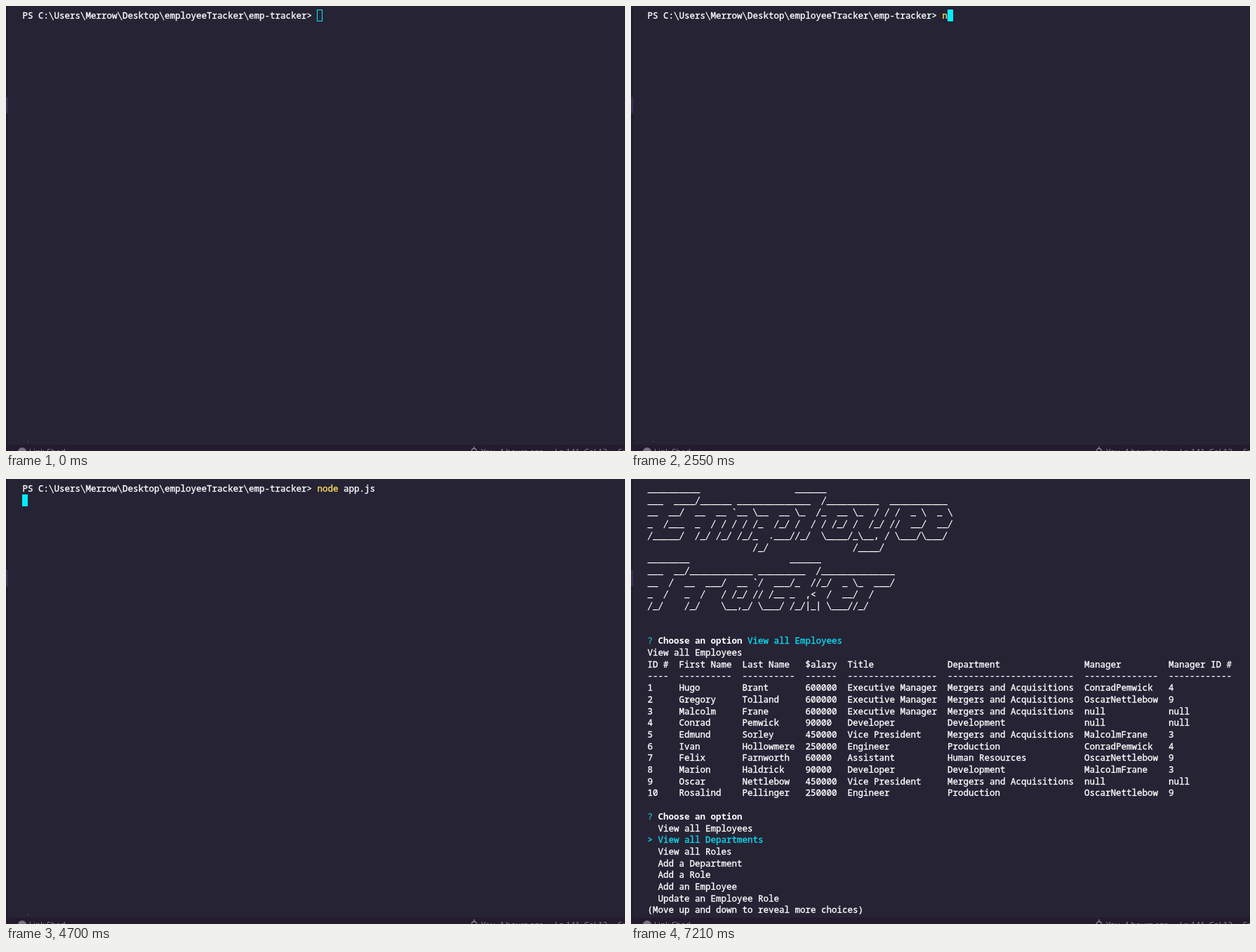
Animation, 882 px wide and 635 px high, one loop 8000 ms. Source, as an HTML page with a canvas:

```html
<!DOCTYPE html>
<html lang="en">
<head>
<meta charset="utf-8">
<title>Employee tracker terminal</title>
<style>
html, body { margin: 0; width: 100%; height: 100%; overflow: hidden; background: #262335; }
canvas { display: block; }
</style>
</head>
<body>
<canvas id="stage" width="882" height="635"></canvas>
<script>
const ctx = document.getElementById('stage').getContext('2d');
const LOOP = 8000, LEFT = 23.5, CELL = 7.5, ROW = 16.7;
const WHITE = '#fff', CYAN = '#0cdcf0', CARET = '#03edf9', YELLOW = '#fede5d', TEAL = '#2ba6be';

const PROMPT = 'PS C:\\Users\\Merrow\\Desktop\\employeeTracker\\emp-tracker> ';
const COMMAND = 'node app.js';
const KEY_TIMES = [2550, 2680, 2780, 2890, 3090, 3550, 3690, 3830, 4090, 4430, 4500];

const BANNER = String.raw`
__________                  ______
___  ____/______ ______________  /__________  ___________
__  __/  __  __ ${'`'}__ \__  __ \_  /_  __ \_  / / /  _ \  _ \
_  /___  _  / / / / /_  /_/ /  / / /_/ /  /_/ //  __/  __/
/_____/  /_/ /_/ /_/_  .___//_/  \____/_\__, / \___/\___/
                    /_/                /____/
________                   ______
___  __/____________ _________  /______________
__  /  __  ___/  __ ${'`'}/  ___/_  //_/  _ \_  ___/
_  /   _  /   / /_/ // /__ _  ,<  /  __/  /
/_/    /_/    \__,_/ \___/ /_/|_| \___//_/`.slice(1).split('\n');

const OPTIONS = ['View all Employees', 'View all Departments', 'View all Roles', 'Add a Department',
  'Add a Role', 'Add an Employee', 'Update an Employee Role'];

const WIDTHS = [4, 10, 10, 6, 17, 24, 14, 12];
const HEADER = 'ID #|First Name|Last Name|$alary|Title|Department|Manager|Manager ID #';
const JOBS = {
  exec: '600000|Executive Manager|Mergers and Acquisitions',
  dev: '90000|Developer|Development',
  vice: '450000|Vice President|Mergers and Acquisitions',
  eng: '250000|Engineer|Production',
  help: '60000|Assistant|Human Resources'
};
// first name, last name, job, manager id
const STAFF = [
  ['Hugo', 'Brant', 'exec', 4], ['Gregory', 'Tolland', 'exec', 9],
  ['Malcolm', 'Frane', 'exec', 0], ['Conrad', 'Pemwick', 'dev', 0],
  ['Edmund', 'Sorley', 'vice', 3], ['Ivan', 'Hollowmere', 'eng', 4],
  ['Felix', 'Farnworth', 'help', 9], ['Marion', 'Haldrick', 'dev', 3],
  ['Oscar', 'Nettlebow', 'vice', 0], ['Rosalind', 'Pellinger', 'eng', 9]
];
const tableRow = text => text.split('|').map((s, i) => s.padEnd(WIDTHS[i] + 2)).join('');
const TABLE = [
  tableRow(HEADER),
  WIDTHS.map(w => '-'.repeat(w)).join('  '),
  ...STAFF.map(([first, last, job, boss], i) => {
    const manager = boss ? STAFF[boss - 1].slice(0, 2).join('') : 'null';
    return tableRow([i + 1, first, last, JOBS[job], manager, boss || 'null'].join('|'));
  })
];

function rect(x, y, w, h, color) {
  ctx.fillStyle = color;
  ctx.fillRect(x, y, w, h);
}

function disc(x, y, r, color) {
  ctx.fillStyle = color;
  ctx.beginPath();
  ctx.arc(x, y, r, 0, Math.PI * 2);
  ctx.fill();
}

function line(x1, y1, x2, y2, width) {
  ctx.lineWidth = width;
  ctx.beginPath();
  ctx.moveTo(x1, y1);
  ctx.lineTo(x2, y2);
  ctx.stroke();
}

// Text on the terminal's character grid; slashes and underscores span their whole cell
function print(row, col, text, color = WHITE, weight = 400) {
  const base = 18.2 + row * ROW;
  ctx.font = `${weight} 12.5px "Noto Sans Mono", "DejaVu Sans Mono", monospace`;
  ctx.fillStyle = ctx.strokeStyle = color;
  [...text].forEach((c, i) => {
    const x = LEFT + (col + i) * CELL;
    if (c === ' ') return;
    if (c === '_') return ctx.fillRect(x, Math.round(base + 0.8), CELL, 1.2);
    if (c === '/') return line(x + 0.8, base + 2, x + 6.6, base - 9.6, 1.15);
    if (c === '\\') return line(x + 0.8, base - 9.6, x + 6.6, base + 2, 1.15);
    ctx.fillText(c, x, base);
    if (weight < 700) {
      ctx.lineWidth = 0.35;
      ctx.strokeText(c, x, base);
    }
  });
}

function drawCaret(row, col, solid = true) {
  const x = Math.round(LEFT + col * CELL - 0.5), y = Math.round(5 + row * ROW);
  if (solid) return rect(x, y, 8, 17, CARET);
  ctx.strokeStyle = CARET;
  ctx.lineWidth = 1;
  ctx.strokeRect(x + 0.5, y + 0.5, 7, 16);
}

function drawFrame() {
  rect(0, 0, 882, 635, '#262335');
  rect(0, 0, 3, 635, '#241b2f');
  rect(0, 130, 3, 23, '#3d2e50');
  rect(0, 626, 882, 9, '#241b2f');
  rect(31, 621, 1, 1, '#8d8797');
  const gray = '#918d97';
  disc(23, 636, 6, '#77727f');
  ctx.font = '11.5px "Open Sans", sans-serif';
  ctx.fillStyle = gray;
  [['Link Shed', 33], ['You, 4 hours ago', 677], ['Ln 141, Col 12', 782], ['Spaces', 872]]
    .forEach(([s, x]) => ctx.fillText(s, x, 640));
  ctx.strokeStyle = gray;
  line(667, 628.5, 667, 631.5, 1.3);
  ctx.beginPath();
  ctx.arc(667, 635, 3.5, 0, Math.PI * 2);
  ctx.stroke();
}

function drawQuestion(row, answer, color) {
  print(row, 0, '?', TEAL);
  print(row, 2, 'Choose an option', WHITE, 700);
  print(row, 19, answer, color);
}

function drawMenu(row, selected, hint) {
  drawQuestion(row, hint);
  OPTIONS.forEach((s, i) => {
    const on = i === selected;
    if (on) print(row + 1 + i, 0, '>', CYAN);
    print(row + 1 + i, 2, s, on ? CYAN : WHITE);
  });
  print(row + 8, 0, '(Move up and down to reveal more choices)');
}

function drawPrompt(t) {
  const typed = KEY_TIMES.filter(k => t >= k).length, start = PROMPT.length;
  print(0, 0, PROMPT);
  print(0, start, COMMAND.slice(0, Math.min(typed, 4)), YELLOW);
  print(0, start + 4, COMMAND.slice(4, Math.max(typed, 4)));
  if (t >= 5030 || (t >= 4360 && t < 4430)) return;
  if (t >= 4700) drawCaret(1, 0);
  else drawCaret(0, start + typed, t >= 1160);
}

function pointerAt(t) {
  if (t < 70 || t >= 1430) return null;
  if (t < 890) {
    const p = Math.min(1, Math.floor((t - 70) / 75) / 10), e = p * p * (3 - 2 * p);
    return [826 - 362.5 * e, 628 - 621 * e];
  }
  if (t < 960) return [463.5, 10];
  if (t < 1290) return [463.5, 15];
  return t < 1360 ? [570, 27] : [775, 61];
}

function drawPointer(t) {
  const at = pointerAt(t);
  if (!at) return;
  const [x, y] = at;
  if (t >= 1160 && t < 1230) disc(x - 2, y - 0.5, 10, 'rgba(235,220,0,.55)');
  ctx.strokeStyle = '#d8d4ae';
  line(x, y - 6.5, x, y + 6.5, 1);
  for (const end of [-6.5, 6.5]) line(x - 3, y + end, x + 3, y + end, 1);
}

function draw(t) {
  drawFrame();
  if (t < 6220) drawPrompt(t);
  if (t >= 5030) {
    const top = t < 6220 ? 2 : 0;
    BANNER.forEach((s, i) => print(top + i, 0, s));
  }
  if (t >= 6220) {
    drawQuestion(13, OPTIONS[0], CYAN);
    print(14, 0, OPTIONS[0]);
    TABLE.forEach((s, i) => print(15 + i, 0, s));
    const moved = t >= 7210;
    drawMenu(28, moved ? 1 : 0, moved ? '' : '(Use arrow keys)');
  } else if (t >= 5030) {
    drawMenu(15, 0, '(Use arrow keys)');
  }
  drawPointer(t);
}

const begin = performance.now();
function tick() {
  draw((performance.now() - begin) % LOOP);
  requestAnimationFrame(tick);
}
tick();
</script>
</body>
</html>
```
